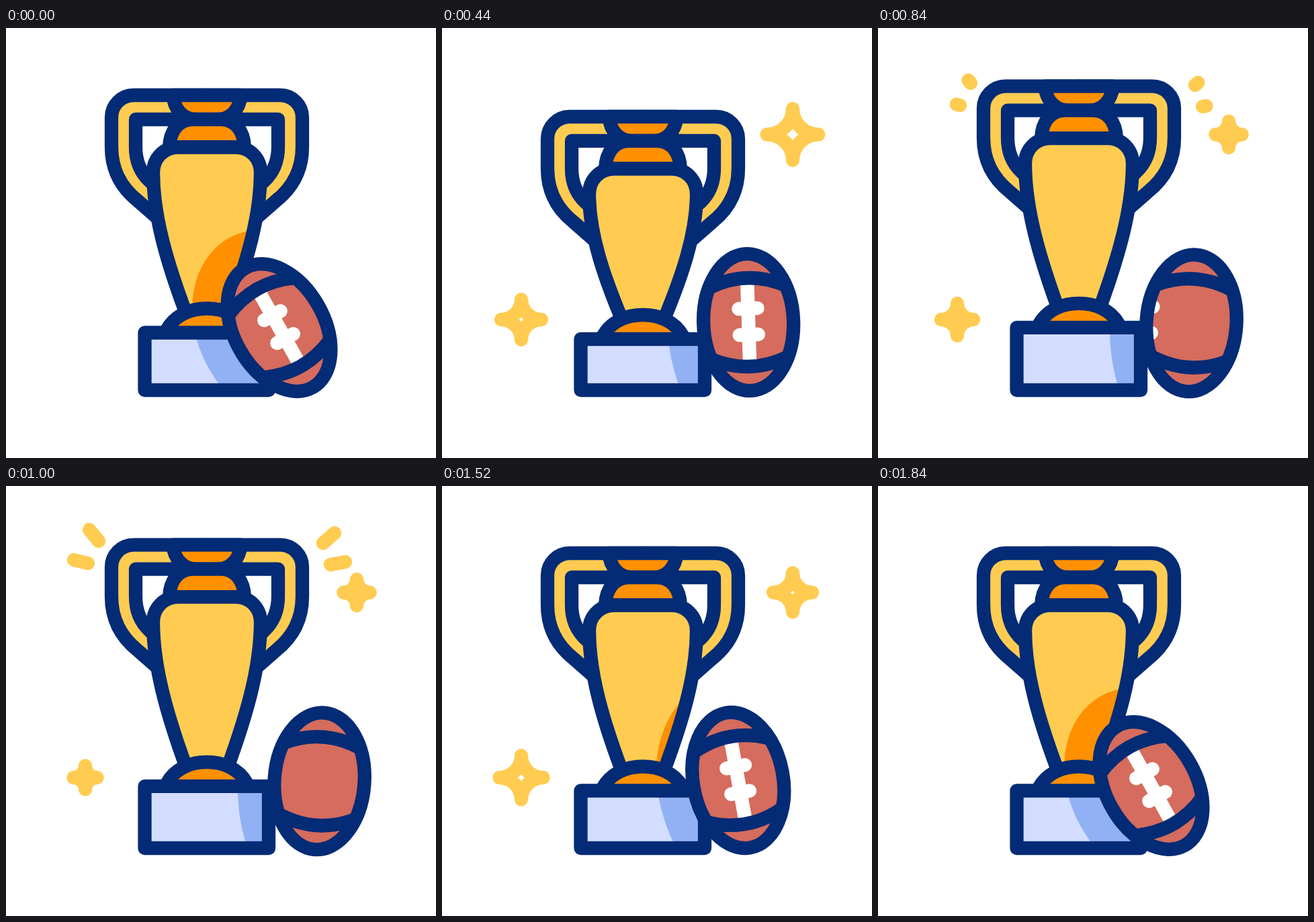
Write an HTML page that moves like this. It is 640 px wide and 640 px high and loops after 2000 ms.

```html
<!DOCTYPE html>
<html lang="en">
<head>
<meta charset="utf-8">
<title>Trophy and ball</title>
<style>
  html, body { margin: 0; width: 100%; height: 100%; overflow: hidden; background: #fff; }
  svg { display: block; width: 100%; height: 100%; }
  .ink { stroke: #042b75; stroke-width: 20.3; stroke-linecap: round; stroke-linejoin: round; }
  .glow { fill: none; stroke: #ffcc51; stroke-width: 20.3; stroke-linecap: round; stroke-linejoin: round; }
  .gold { fill: #ffcc51; }
  .orange { fill: #ff9000; }
  .none { fill: none; }
</style>
</head>
<body>
<svg viewBox="0 0 640 640">
  <defs>
    <clipPath id="bodyClip"><path class="bodyShape"/></clipPath>
    <clipPath id="baseClip"><path class="baseShape"/></clipPath>
    <clipPath id="ballClip"><ellipse rx="67" ry="102"/></clipPath>
    <path id="shade" d="M-121 0A121 153 0 0 1 121 0A121 190 0 0 1 -121 0Z"/>
    <path id="handle" d="M299 100H190A33 33 0 0 0 157 133V177C157 212 172 238 196 257L236 292L232 243L214 228C201 216 193 200 193 177V136H299Z"/>
    <path id="band" d="M-57 -53Q0 -79 57 -53"/>
  </defs>

  <g id="sparks"></g>
  <path id="starRight" class="glow"/>
  <path id="starLeft" class="glow"/>

  <g id="cup" class="ink">
    <use href="#handle" class="gold"/>
    <use href="#handle" class="gold" transform="matrix(-1 0 0 1 598 0)"/>
    <path class="orange" d="M248.500 100C250 121 264 136 283 136H315C334 136 348 121 349.500 100Z"/>
    <path class="orange" d="M243 177.500C244 153 257 136 278 136H320C341 136 354 153 355 177.500Z"/>
  </g>
  <path class="bodyShape gold"/>
  <g clip-path="url(#bodyClip)"><use href="#shade" class="orange follow"/></g>
  <path class="bodyShape ink none"/>
  <path id="dome" class="ink orange" d="M240 448C252 427 275 417.500 299 417.500S346 427 358 448"/>
  <path class="baseShape" fill="#d3ddff"/>
  <g clip-path="url(#baseClip)"><use href="#shade" class="follow" fill="#92b1f4"/></g>
  <path class="baseShape ink none"/>

  <g class="follow">
    <ellipse rx="67" ry="102" fill="#d56c5d"/>
    <g clip-path="url(#ballClip)">
      <g id="laces" fill="none" stroke="#fff" stroke-width="20.500">
        <path d="M0 -66V66"/>
        <path d="M-14 -20.500H14M-14 18.500H14" stroke-linecap="round"/>
      </g>
    </g>
    <g class="ink none">
      <use href="#band"/>
      <use href="#band" transform="scale(1 -1)"/>
      <ellipse rx="67" ry="102"/>
    </g>
  </g>
</svg>
<script>
const LOOP = 2000, STEP = 40;
const $ = id => document.getElementById(id);
const setAll = (selector, name, value) =>
  document.querySelectorAll(selector).forEach(el => el.setAttribute(name, value));

// Cosine ease from 0 to 1 between two times.
const ease = (t, from, to) => {
  const p = Math.min(1, Math.max(0, (t - from) / (to - from)));
  return (1 - Math.cos(Math.PI * p)) / 2;
};

// Eased value along [time, value] keys.
const track = (t, keys) => keys.slice(1).reduce((value, [time, next], i) =>
  value + (next - keys[i][1]) * ease(t, keys[i][0], time), keys[0][1]);

// Each spark runs from its inner to its outer end.
const sparks = [
  [138, 82, 124, 65], [122, 115, 101, 110],
  [472, 85, 489, 70], [483, 117, 505, 113]
].map(ends => {
  const el = document.createElementNS('http://www.w3.org/2000/svg', 'path');
  el.setAttribute('class', 'glow');
  $('sparks').append(el);
  return { el, ends };
});

function drawSparks(t) {
  const head = ease(t, 800, 920), tail = ease(t, 1000, 1120);
  for (const { el, ends: [x1, y1, x2, y2] } of sparks) {
    const at = k => `${x1 + (x2 - x1) * k} ${y1 + (y2 - y1) * k}`;
    el.setAttribute('d', head - tail > 0.001 ? `M${at(tail)}L${at(head)}` : '');
  }
}

function drawStar(el, t, x, y, mean, swing, peak) {
  const r = mean + swing * Math.cos(2 * Math.PI * (t - peak) / 800);
  const scale = ease(t, 20, 200) * (1 - ease(t, 1700, 1840));
  const arc = (px, py) => `A${r} ${r} 0 0 0 ${px} ${py}`;
  el.setAttribute('d', scale > 0.02
    ? `M0 ${-r}${arc(r, 0)}${arc(0, r)}${arc(-r, 0)}${arc(0, -r)}Z` : '');
  el.setAttribute('transform', `translate(${x} ${y}) scale(${scale})`);
}

function drawTrophy(t) {
  const pose = (low, high) => track(t, [[40, 0], [440, low], [925, high], [1140, 0]]);
  const top = pose(32, -17), base = pose(9.5, -9);
  const y = v => v + top + (base - top) * Math.max(0, (v - 215) / 210);
  $('cup').setAttribute('transform', `translate(0 ${top})`);
  $('dome').setAttribute('transform', `translate(0 ${base})`);
  setAll('.bodyShape', 'd',
    `M256 ${y(177.5)}H342C363 ${y(177.5)} 379 ${y(194)} 379 ${y(215)}` +
    `C379 ${y(280)} 358 ${y(350)} 330 ${y(425)}H268` +
    `C240 ${y(350)} 219 ${y(280)} 219 ${y(215)}C219 ${y(194)} 235 ${y(177.5)} 256 ${y(177.5)}Z`);
  setAll('.baseShape', 'd', `M206.500 ${453.5 + base}H391V539H206.500Z`);
}

function drawBall(t) {
  const roll = ease(t, 40, 590) - ease(t, 1270, 1820);
  const x = 406.5 + 60 * roll;
  const y = 446 - 23.9 * roll + 17.2 * roll * roll;
  setAll('.follow', 'transform', `translate(${x} ${y}) rotate(${-29.3 + 33.2 * roll})`);
  const spin = t < 1000 ? -85 * ease(t, 480, 960) : 85 * (1 - ease(t, 1020, 1420));
  $('laces').setAttribute('transform', `translate(${spin} 0)`);
}

function draw(t) {
  drawSparks(t);
  drawStar($('starRight'), t, 522, 158.5, 29, 11.5, 520);
  drawStar($('starLeft'), t, 118, 434, 27, 9.5, 600);
  drawTrophy(t);
  drawBall(t);
}

const start = performance.now();
function tick() {
  const t = (performance.now() - start) % LOOP;
  draw(Math.floor(t / STEP) * STEP);
  requestAnimationFrame(tick);
}
tick();
</script>
</body>
</html>
```
